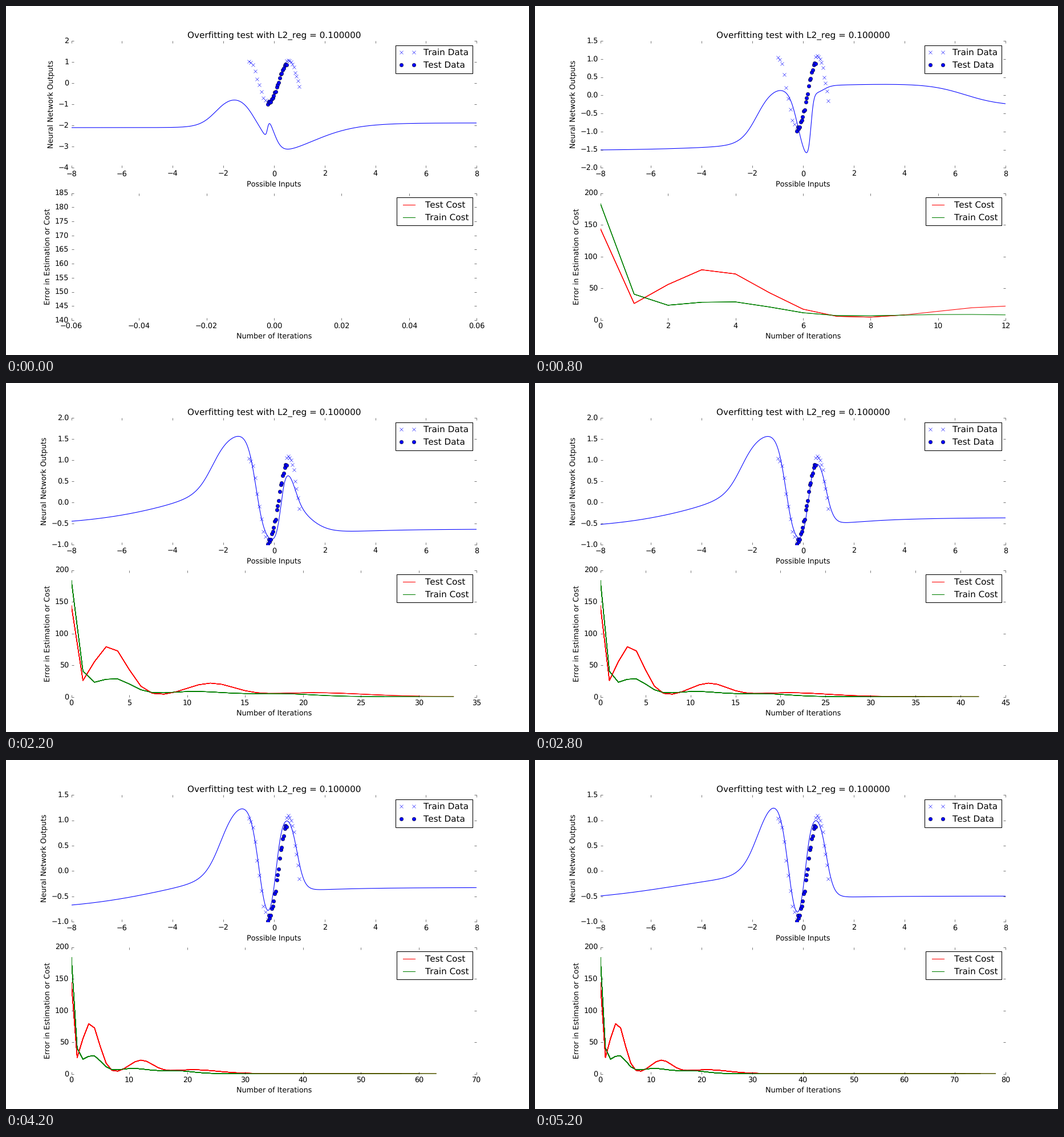
These frames come from a looping animation (917x611 px, 5400 ms). A matplotlib script:

```python
import numpy as np
import matplotlib.pyplot as plt
from matplotlib.animation import FuncAnimation

W, H, DPI = 917, 611, 76.4
FRAMES, INTERVAL, STEP = 27, 200, 3

plt.style.use("classic")
plt.rcParams.update({
    "font.family": "DejaVu Sans",
    "text.hinting": "none",
    "text.kerning_factor": 6,
    "figure.facecolor": "white",
    "savefig.dpi": "figure",
})

# The network is a sum of sigmoid units whose weights drift during training:
# (height, centre) at the key iterations, and width as a rule of the iteration.
KEYS = [0, 12, 21, 33, 42, 63, 78]
BASE = [-2.1, -1.521, -1.174, -.548, -.627, -.772, -.603]
UNITS = [
    # long left slope
    ([0, .3, .93, 1.38, 1.45, .857, .62],
     [-2, -2, -2, -3, -3, -4, -5], lambda i: 2),
    # left hill, up and down
    ([1.55, 1.6, 1.43, 1.27, 1.29, 1.48, 1.62],
     [-2.28, -1.82, -2.28, -2.43, -2.43, -2.1, -1.78], lambda i: .32),
    ([-2.55, -2.3, -2.47, -2.81, -2.9, -2.8, -3],
     [-.75, -.2, -.415, -.71, -.68, -.59, -.58],
     lambda i: .18 + .12 * np.exp(-i / 4)),
    # right hill, up and down
    ([1.1, 2, 2.35, 1.9, 2.15, 2.5, 2.6],
     [-.26, .313, .252, .272, .21, .07, .075],
     lambda i: min(.135, .035 + .0019 * i)),
    ([-1.68, .25, -.3, -.92, -1.72, -1.59, -1.73],
     [0, .8, .9, .82, .907, .9, .91], lambda i: .15),
    # slow change on the far right
    ([1.8, -.62, -1.17, -.9, 0, 0, 0],
     [1.44, 6.4, 2.85, 1.3, 1.3, 1.3, 1.3],
     lambda i: .4 + .5 * np.exp(-(i / 18) ** 2)),
]

grid = np.linspace(-8, 8, 801)


def output(i):
    y = np.full_like(grid, np.interp(i, KEYS, BASE))
    for height, centre, width in UNITS:
        z = (grid - np.interp(i, KEYS, centre)) / width(i)
        y += np.interp(i, KEYS, height) * (1 + np.tanh(z / 2)) / 2
    return y


def wave(x):
    return np.sin(4 * (x - .16))


def bump(k, height, centre, width):
    return height * np.exp(-((k - centre) / width) ** 2)


def test_cost(k):
    return (.9 + 136 * np.exp(-6 * k) + bump(k, 80, 3.3, 2.13)
            + bump(k, 20.5, 12, 2.9) + bump(k, 6, 21, 6))


def train_cost(k):
    return (.8 + 181 * np.exp(-1.7 * k) + bump(k, 28, 3.6, 2.2)
            + bump(k, 8, 10.5, 4) + bump(k, 4.5, 18, 4))


rng = np.random.default_rng(3)
train_x = np.concatenate([np.linspace(-1, -.25, 10), np.linspace(.5, 1, 10)])
train_y = wave(train_x) + .09 + rng.uniform(-.06, .06, 20)
test_x = np.linspace(-.25, .5, 20)
test_y = .93 * wave(test_x) + rng.uniform(-.06, .06, 20)

# tiny surplus keeps the size from truncating to one pixel less
fig, (top, low) = plt.subplots(
    2, 1, figsize=((W + 1e-6) / DPI, (H + 1e-6) / DPI), dpi=DPI)
for ax in (top, low):
    ax.spines[:].set_visible(False)

curve, = top.plot(grid, output(0), "b-")
top.plot(train_x, train_y, "bx", label="Train Data")
top.plot(test_x, test_y, "bo", label="Test Data")
top.set_title("Overfitting test with L2_reg = 0.100000")
top.set_xlabel("Possible Inputs", labelpad=6)
top.set_ylabel("Neural Network Outputs")
top.legend()

# each step plots the whole history again over the previous lines
history = []
for n in range(FRAMES):
    k = np.arange(STEP * n + 1)
    history.append(low.plot(k, test_cost(k), "r-", k, train_cost(k), "g-"))
low.set_xlabel("Number of Iterations", labelpad=6)
low.set_ylabel("Error in Estimation or Cost")
low.legend(history[0], ("Test Cost", "Train Cost"))


def update(n):
    curve.set_ydata(output(STEP * n))
    for i, pair in enumerate(history):
        for line in pair:
            line.set_visible(i <= n)
    for ax in (top, low):
        ax.relim(visible_only=True)
        ax.autoscale_view()


anim = FuncAnimation(fig, update, frames=FRAMES, interval=INTERVAL,
                     repeat=True, repeat_delay=0, blit=False)
plt.show()
```
